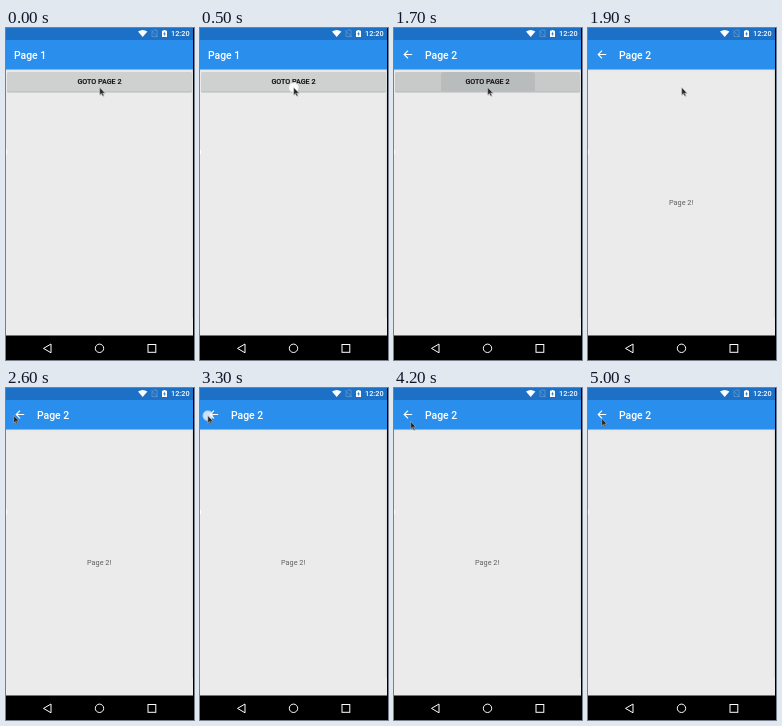
An HTML page that plays this animation: 188x332 px, repeating every 5100 ms.

```html
<!DOCTYPE html>
<html lang="en">
<head>
<meta charset="utf-8">
<title>Page navigation</title>
<style>
html, body { margin: 0; width: 100%; height: 100%; overflow: hidden; background: #ebebeb; }
svg { display: block; width: 188px; height: 332px; }
text { font-family: Roboto, sans-serif; font-weight: 500; }
</style>
</head>
<body>
<svg viewBox="0 0 188 332">
  <defs>
    <linearGradient id="shade" x2="0" y2="1">
      <stop offset="0" stop-color="#dcdfe1"/><stop offset="1" stop-color="#ebebeb"/>
    </linearGradient>
    <radialGradient id="glow">
      <stop offset=".6" stop-color="#fff" stop-opacity=".95"/>
      <stop offset=".8" stop-color="#eee" stop-opacity=".85"/>
      <stop offset="1" stop-color="#aaa" stop-opacity="0"/>
    </radialGradient>
    <clipPath id="buttonClip"><rect x="1" y="44" width="185" height="19.5" rx="1.5"/></clipPath>
  </defs>

  <rect width="188" height="332" fill="#ebebeb"/>
  <rect y="41" width="188" height="2.5" fill="url(#shade)"/>
  <rect x="185.8" y="41" width="1.2" height="249" fill="#dadbdb"/>
  <rect y="122" width="1" height="4" fill="#fff"/>

  <g id="button">
    <rect x="1" y="44.6" width="185" height="19.8" rx="1.5" fill="#b6b8b8"/>
    <rect id="face" x="1" y="44" width="185" height="19.5" rx="1.5"/>
    <rect id="wave" y="44" height="20" rx="3" fill="#b9bcbd" clip-path="url(#buttonClip)"/>
    <text x="93.5" y="56.4" font-size="7.2" text-anchor="middle" fill="#111" stroke="#111" stroke-width=".15">GOTO PAGE 2</text>
  </g>
  <text id="label" x="81" y="177.1" font-size="7.3" fill="#606060" style="font-weight:400">Page 2!</text>

  <rect y="12" width="188" height="29.5" fill="#2a8fec"/>
  <rect width="188" height="12" fill="#1c71c7"/>
  <circle id="ripple" cx="14" cy="26.5" r="14.5" fill="#fff"/>
  <path id="arrow" d="M18.2 26.5H10.4M14 22.7L10.2 26.5L14 30.3" fill="none" stroke="#fff" stroke-width="1.1"/>
  <text id="title" y="30.6" font-size="10.4" fill="#fff"></text>

  <g transform="translate(0 -.4)">
    <path d="M132 4Q136.7 .8 141.4 4L136.7 9.4Z" fill="#fff"/>
    <path d="M146 4.2L147.8 2.5H151V9H146ZM145 2.6L151.6 9.4" fill="none" stroke="#6c9ccb" stroke-width=".7"/>
    <path d="M156 3.2H157.5V2.3H159.5V3.2H161V9.4H156Z" fill="#fff"/>
    <path d="M158.8 4L157.2 6.6H158.3V8.6L159.9 5.9H158.8Z" fill="#1c71c7"/>
    <text x="165" y="8.7" font-size="7.3" fill="#fff">12:20</text>
  </g>

  <rect y="307.5" width="188" height="25" fill="#000"/>
  <g fill="none" stroke="#fff">
    <path d="M37.5 320.4L45 316V324.8Z" stroke-linejoin="round"/>
    <circle cx="93.5" cy="320.3" r="4.2"/>
    <rect x="142" y="316.5" width="7.8" height="7.8"/>
  </g>
  <rect x="187" width="1" height="332" fill="#000"/>

  <circle id="halo" r="6" fill="url(#glow)"/>
  <g id="cursor">
    <path d="M.7 1V8.2L2.2 6.8L3.5 9.3L4.8 8.7L3.7 6.3H6Z" fill="#000" opacity=".25"/>
    <path d="M0 0V7.4L1.7 5.9L2.9 8.6L4.1 8.1L2.9 5.5H5.2Z" fill="#262626" stroke="#d5d5d5" stroke-width=".45"/>
  </g>
</svg>
<script>
const LOOP = 5100, STEP = 100;
const $ = id => document.getElementById(id);
const set = (id, attrs) => {
  for (const key in attrs) $(id).setAttribute(key, attrs[key]);
};

// Progress from 0 to 1 between two times.
const ramp = (t, from, to) => Math.min(1, Math.max(0, (t - from) / (to - from)));
// Rises to 1, holds, then falls back to 0.
const pulse = (t, start, rise, hold, fall) =>
  Math.min(ramp(t, start, start + rise), 1 - ramp(t, start + rise + hold, start + rise + hold + fall));
const curve = (a, b, c, k) => a * (1 - k) ** 2 + 2 * b * k * (1 - k) + c * k * k;

// Swoop from the button to the back arrow, settle on it, then flick out and glide back.
function cursorAt(t) {
  const swoop = ramp(t, 2000, 2600);
  const settle = ramp(t, 3200, 3800) ** 2;
  const flick = t < 4000 ? 0 : 36 * Math.exp((4000 - t) / 80);
  return [
    curve(93.7, 70, 7.7, swoop) + 6 * settle + flick,
    curve(59.5, 190, 27.6, swoop) + 2.9 * settle + flick
  ];
}

function render(t) {
  const [x, y] = cursorAt(t);
  const second = t >= 1200;
  const width = 94 * ramp(t, 1600, 1700) + 91 * ramp(t, 1700, 1800);
  const press = pulse(t, 0, 500, 200, 200);
  const back = pulse(t, 3200, 100, 100, 100);
  const backAgain = pulse(t, 4600, 100, 100, 200);

  set("cursor", { transform: `translate(${x} ${y})` });
  set("halo", { cx: x, cy: y, opacity: Math.max(press, 0.8 * back, 0.8 * backAgain) });
  set("ripple", { opacity: 0.09 * pulse(t, 3300, 200, 100, 200) });
  set("button", { opacity: 1 - ramp(t, 1700, 1900) });
  set("wave", { x: 94 - width / 2, width });
  set("face", { fill: t >= 1700 ? "#c8c9c9" : "#cfd1d0" });
  set("label", {
    opacity: pulse(t, 1700, 200, 2800, 300) - 0.5 * pulse(t, 3400, 200, 0, 200)
  });
  set("arrow", { opacity: second ? 1 : 0 });
  set("title", { x: second ? 31 : 8 });
  $("title").textContent = second ? "Page 2" : "Page 1";
}

const start = performance.now();
function tick() {
  const t = (performance.now() - start) % LOOP;
  render(Math.floor(t / STEP) * STEP);
  requestAnimationFrame(tick);
}
tick();
</script>
</body>
</html>
```
